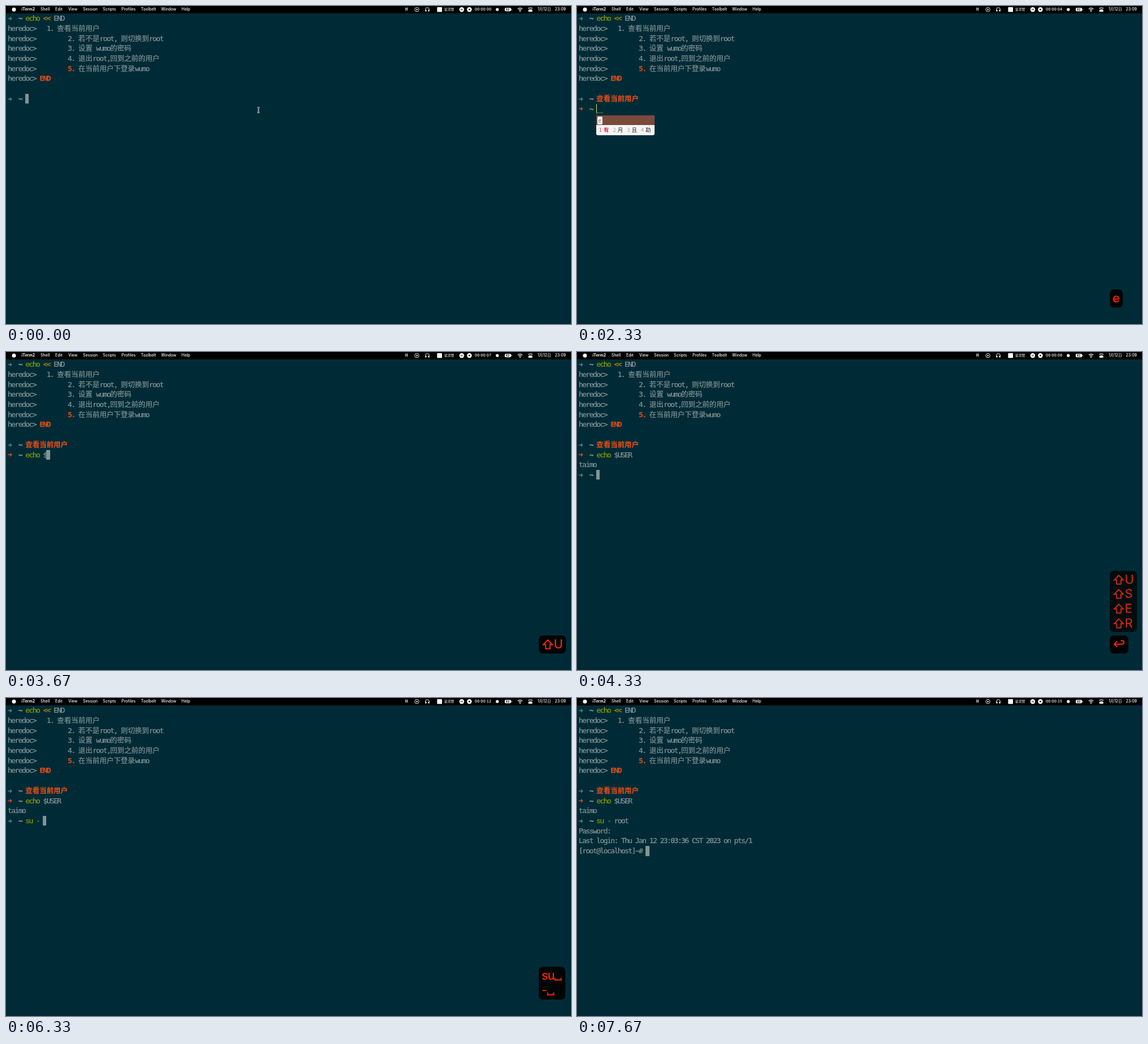
Recreate the animation shown at these times as an HTML page. Size 998 by 561 pixels, loop 8000 ms.

```html
<!DOCTYPE html>
<html lang="zh">
<head>
<meta charset="utf-8">
<title>Terminal session</title>
<style>
html, body { margin: 0; width: 100%; height: 100%; overflow: hidden; background: #002b36; }
body { position: relative; }
.run, .bar span, .pop, .pop span, #cursor, #mark, #icons, #mouse { position: absolute; white-space: pre; }
.run {
  font: 13px/17.69px "DejaVu Sans Mono", monospace;
  letter-spacing: -1.586px; color: #839496; -webkit-text-stroke: .22px currentColor;
}
.run.cjk { font: 12.48px/17.69px "Noto Sans CJK SC", "Noto Sans CJK", sans-serif; letter-spacing: 0; }
.run.bold { font-weight: 700; }
.run.green { color: #859900; }
.run.yellow { color: #b58900; }
.run.orange { color: #d64c18; }
.run.light { color: #93a1a1; }
.run.dim { color: #5f7b7c; }
.run svg { position: absolute; left: 0; top: 4.8px; }
.bar {
  position: absolute; left: 0; top: 0; width: 998px; height: 12.6px; background: #000; color: #fff;
  font: 500 6.9px/12.6px Inter, "Noto Sans CJK SC", "Noto Sans CJK", sans-serif;
}
#icons { left: 0; top: 0; }
#cursor { width: 6.4px; height: 17.6px; background: #839496; }
#cursor.thin { width: 1.2px; background: #e6dc4c; }
#mark { width: 12px; height: 1px; background: #6f7f50; }
.pop { left: 34px; top: 193px; border-radius: 3px; overflow: hidden; background: #f5f5f5; }
.pop span { font: 9.6px/17px "Noto Sans CJK SC", "Noto Sans CJK", sans-serif; color: #222; top: 17px; }
.pop .num { color: #999; font-size: 8.8px; }
.pop .hot { color: #e8274f; }
#list { width: 103px; height: 34.5px; }
#list i { position: absolute; left: 0; top: 0; width: 103px; height: 16.5px; background: #7a4a3b; }
#list .code { left: 1.5px; top: 1.5px; width: 9.5px; height: 14px; line-height: 14px; border-radius: 2px; background: #f2f2f2; color: #777; text-align: center; }
#ascii { width: 18.5px; height: 16.5px; }
#ascii span { left: 0; top: 0; width: 18.5px; line-height: 16.5px; text-align: center; color: #35b535; font-size: 8.5px; font-family: Inter, sans-serif; }
#mouse { left: 441px; top: 177px; }
#keys { position: absolute; left: 941px; bottom: 29.5px; display: flex; flex-direction: column; align-items: flex-start; gap: 5.5px; }
.bezel {
  padding: 3px 6px 3px 5px; border-radius: 7px; background: rgba(0, 0, 0, .9); color: #ff2a0a;
  font: 400 22px/25.7px Inter, sans-serif; letter-spacing: -1.1px; white-space: pre;
  -webkit-text-stroke: .2px currentColor;
}
.bezel div { height: 25.7px; }
.bezel svg { height: 25.7px; vertical-align: top; fill: none; stroke: currentColor; stroke-width: 1.9; }
</style>
</head>
<body>
<div class="bar" id="bar">
  <svg id="icons" width="998" height="13" fill="none" stroke="#fff" stroke-width=".9">
    <g fill="#fff" stroke="none">
      <circle cx="14" cy="6.2" r="3.5"/>
      <rect x="761.5" y="2" width="8.6" height="8.6" rx="1"/>
      <circle cx="805" cy="6.2" r="4.2"/>
      <circle cx="818.5" cy="6.2" r="4.2"/>
      <circle cx="867.8" cy="6.2" r="2.6"/>
      <rect x="881" y="3.2" width="11" height="6" rx="1.6"/>
      <rect x="892.6" y="5" width="1" height="2.4"/>
      <path d="M724.8 4.4l3 1.8-3 1.8z"/>
      <rect x="740.6" y="6.4" width="2" height="3.4" rx=".8"/>
      <rect x="745.8" y="6.4" width="2" height="3.4" rx=".8"/>
      <circle cx="908" cy="9" r="1.1"/>
      <rect x="922.5" y="6.8" width="7.4" height="3.2" rx="1.6"/>
    </g>
    <circle cx="725.8" cy="6.2" r="3.7"/>
    <path d="M740.9 7.5V6a3.3 3.3 0 0 1 6.6 0v1.5"/>
    <path d="M803.9 4.7v3M806.1 4.7v3" stroke="#000"/>
    <rect x="817.3" y="5" width="2.4" height="2.4" fill="#000" stroke="none"/>
    <path d="M903.9 5.2a5.9 5.9 0 0 1 8.2 0M905.8 7.2a3.2 3.2 0 0 1 4.4 0" stroke-width="1.2"/>
    <rect x="923" y="2.8" width="6.4" height="2.6" rx="1.3"/>
  </svg>
</div>
<div id="term"></div>
<div id="cursor"></div>
<div id="mark"></div>
<div class="pop" id="list"><i></i><span class="code">e</span></div>
<div class="pop" id="ascii"><span>A</span></div>
<svg id="mouse" width="10" height="13" fill="none">
  <defs><path id="beam" d="M3 2.2Q5 2.2 5 3.6Q5 2.2 7 2.2M5 3.6V9.4M3 10.6Q5 10.6 5 9.4Q5 10.6 7 10.6"/></defs>
  <use href="#beam" stroke="#ddd" stroke-width="2.2"/>
  <use href="#beam" stroke="#222" stroke-width=".8"/>
</svg>
<div id="keys"></div>
<script>
const $ = id => document.getElementById(id);
const LOOP = 8000, STEPS = 24;
const CELL = 6.24, ROW = 17.69, LEFT = 3, TOP = 13.3;
const colX = col => LEFT + col * CELL;
const rowY = row => TOP + row * ROW;
const timed = [];

function add(parent, tag, cls, html, x, y) {
  const el = document.createElement(tag);
  el.className = cls;
  el.innerHTML = html;
  if (x !== undefined) el.style.left = x + 'px';
  if (y !== undefined) el.style.top = y + 'px';
  parent.append(el);
  return el;
}

// Writes text on the cell grid; Chinese characters take two cells.
function put(row, col, text, cls = '', from = 0) {
  for (const part of text.match(/[\u4e00-\u9fff]+|[^\u4e00-\u9fff]+/g)) {
    const wide = part.charCodeAt(0) >= 0x4e00;
    const el = add($('term'), 'div', `run ${cls} ${wide ? 'cjk' : ''}`, '', colX(col), rowY(row));
    el.textContent = part;
    timed.push([el, from]);
    col += part.length * (wide ? 2 : 1);
  }
}

function prompt(row, cls, from) {
  const arrow = '<svg width="9" height="9" fill="none" stroke="currentColor" stroke-width="1.4"><path d="M.3 4.3H6.5M4 1.6L6.8 4.3L4 7"/></svg>';
  timed.push([add($('term'), 'div', 'run ' + cls, arrow, colX(0), rowY(row)), from]);
  put(row, 3, '~', 'light bold', from);
}

prompt(0, 'dim', 0);
put(0, 5, 'echo', 'green');
put(0, 10, '<<', 'yellow');
put(0, 13, 'END');
for (let row = 1; row <= 6; row++) put(row, 0, 'heredoc>');
put(1, 11, '1. 查看当前用户');
put(2, 17, '2. 若不是root, 则切换到root');
put(3, 17, '3. 设置 wumo的密码');
put(4, 17, '4. 退出root,回到之前的用户');
put(5, 17, '5.', 'orange bold');
put(5, 20, '在当前用户下登录wumo');
put(6, 9, 'END', 'orange bold');

prompt(8, 'dim', 0);
['查看', '当前', '用户'].forEach((word, i) => put(8, 5 + 4 * i, word, 'orange bold', 2 + i));
prompt(9, 'orange', 6);
put(9, 5, 'echo', 'green', 8);
put(9, 10, '$', '', 11);
put(9, 11, 'USER', '', 12);
put(10, 0, 'taimo', '', 13);
prompt(11, 'dim', 13);
put(11, 5, 'su', 'green', 18);
put(11, 8, '-', '', 19);
put(11, 10, 'root', '', 20);
put(12, 0, 'Password:', '', 21);
put(13, 0, 'Last login: Thu Jan 12 23:03:36 CST 2023 on pts/1', '', 22);
put(14, 0, '[root@localhost]~#', '', 23);

// Menu bar
const label = (x, text, style = '') => {
  const el = add($('bar'), 'span', '', text, x, 0);
  el.style.cssText += style;
  return el;
};
label(27.5, 'iTerm2', 'font-weight:700');
Object.entries({ Shell: 61, Edit: 87, View: 110, Session: 136, Scripts: 171, Profiles: 204, Toolbelt: 238.5, Window: 274, Help: 310 })
  .forEach(([text, x]) => label(x, text));
label(704, '⌘', 'font-family:"DejaVu Sans",sans-serif');
label(774, '鼠须管', 'font-size:5.9px');
label(883, '62', 'color:#000;font-size:5px;font-weight:700');
label(939, '1月12日');
label(969.5, '23:09');
const clock = label(828, '', 'font-size:6.6px;font-variant-numeric:tabular-nums');

// Candidate list
['有', '月', '且', '助'].forEach((word, i) => {
  const x = 5 + 24.7 * i, hot = i ? '' : 'hot';
  add($('list'), 'span', 'num ' + hot, i + 1, x);
  add($('list'), 'span', hot, word, x + 8).style.fontWeight = i ? 400 : 700;
});

// [step, row, column, thin]
const cursors = [
  [0, 8, 5], [1, 8, 5, true], [2, 8, 9], [3, 8, 13], [4, 8, 18], [6, 9, 5], [7, 9, 5, true],
  [8, 9, 9], [9, 9, 10], [11, 9, 11], [12, 9, 15], [13, 11, 5], [18, 11, 8], [19, 11, 10],
  [20, 11, 14], [21, 12, 10], [22, 14, 0], [23, 14, 19]
];

// [step, bezels from top to bottom]; "/" breaks a line, a number is the opacity of the bezel before it
const strokes = [
  [0], [1, 'sjrh'], [2, 'iv'], [3, 'ivue'], [4, 'ivue/etyn/_'], [5], [6, '^C'], [7, 'e'],
  [8, 'ech/o'], [9, '_', .6], [10, '+4'], [11, '+U'], [12, '+U/+S/+E/+R'],
  [13, '+U/+S/+E/+R', .8, '='], [14], [18, 'su_'], [19, 'su_/-_'], [20, 'root'],
  [21, 'root', .8, '='], [22, 'root', .8, '='], [23]
];
const glyph = (width, d) => `<svg width="${width}" viewBox="0 0 ${width} 25.7"><path d="${d}"/></svg>`;
const glyphs = {
  _: glyph(13.5, 'M1.5 16.5V20.5H12.5V16.5'),
  '+': glyph(21.5, 'M11 5L3 13.3H7.2V20.5H14.8V13.3H19Z'),
  '^': glyph(20, 'M4 12L10 5.5L16 12'),
  '=': glyph(22, 'M8 7.5L3 12.5L8 17.5M3.5 12.5H16Q20 12.5 20 9.2Q20 6 16.5 6H14.5')
};
const lineHtml = line => `<div>${line.replace(/[_+^=]/g, c => glyphs[c])}</div>`;

function showKeys(items) {
  $('keys').textContent = '';
  let last;
  for (const item of items) {
    if (typeof item === 'number') last.style.opacity = item;
    else last = add($('keys'), 'div', 'bezel', item.split('/').map(lineHtml).join(''));
  }
}

const latest = (list, step) => list.filter(entry => entry[0] <= step).pop();
const toggle = (el, on) => { el.style.visibility = on ? 'visible' : 'hidden'; };

function render(step) {
  timed.forEach(([el, from]) => toggle(el, step >= from));
  const [, row, col, thin] = latest(cursors, step);
  const cursor = $('cursor');
  cursor.className = thin ? 'thin' : '';
  cursor.style.left = colX(col) - .4 + 'px';
  cursor.style.top = rowY(row) + 'px';
  $('mark').style.left = colX(col) + 'px';
  $('mark').style.top = rowY(row) + 15.5 + 'px';
  toggle($('mark'), thin);
  toggle($('mouse'), step === 0);
  toggle($('list'), step === 7);
  toggle($('ascii'), step === 8 || step === 9);
  showKeys(latest(strokes, step).slice(1));
  const seconds = Math.max(0, Math.floor((2 * step - 1) / 3));
  clock.textContent = '00:00:' + String(seconds).padStart(2, '0');
}

let shown = -1;
const start = performance.now();
function tick() {
  const time = (performance.now() - start) % LOOP;
  const step = Math.min(STEPS - 1, Math.floor((time + 4) * STEPS / LOOP));
  if (step !== shown) render(shown = step);
  requestAnimationFrame(tick);
}
tick();
</script>
</body>
</html>
```
